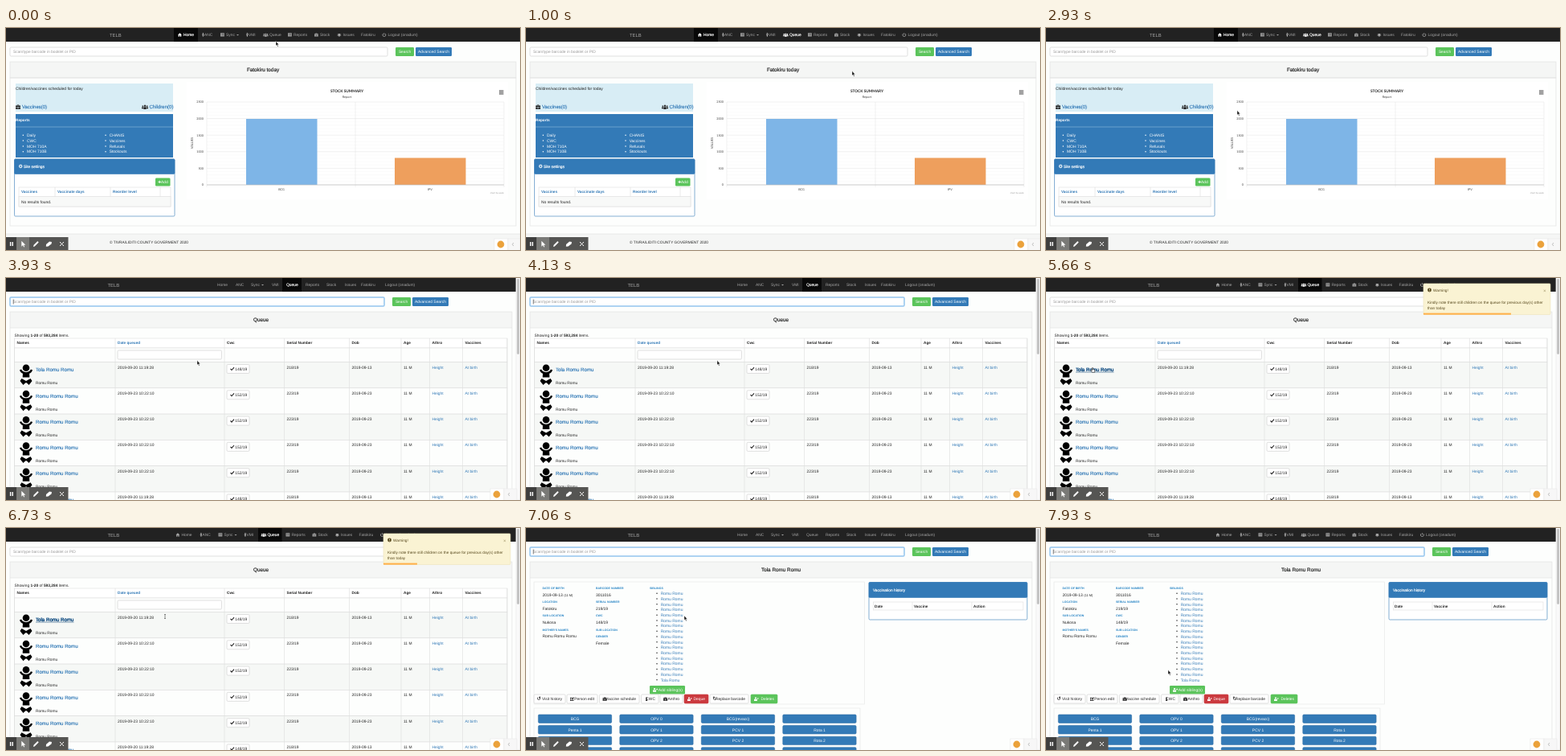
These frames come from a looping animation (640 px wide and 276 px high, 8000 ms). An HTML page:

```html
<!DOCTYPE html>
<html lang="en">
<head>
<meta charset="utf-8">
<title>Clinic queue</title>
<style>
  html, body { margin: 0; height: 100%; overflow: hidden; background: #fdfefd; }
  svg { display: block; width: 100vw; height: 100vh; }
  text { font-family: "Liberation Sans", Arial, sans-serif; text-rendering: geometricPrecision; white-space: pre; }
  .chart text { font-family: Lato, sans-serif; }
  .glyph { font-family: "DejaVu Sans", sans-serif; }
</style>
</head>
<body>
<svg id="stage" viewBox="0 0 640 276" preserveAspectRatio="none"></svg>
<script>
const BLUE = '#337ab7', GREEN = '#5bc45b', RED = '#cb3a3f', INK = '#222', LINE = '#ddd', PALE = '#f5f6f5';
const LOOP = 8000, QUEUE_AT = 3800, QUEUE_ICONS_AT = 4400, CHILD_AT = 7000, CHILD_ICONS_AT = 7400;
const TOAST_AT = 4720, BAR_AT = 4880, BAR_TIME = 2520;

const place = 'Fatokiru', user = 'onadum', surname = 'Romu Romu';
const child = 'Tola ' + surname, otherChild = 'Romu ' + surname;

const times = (n, draw) => Array.from({ length: n }, (_, i) => draw(i)).join('');
const rect = (x, y, w, h, fill, stroke = 'none', r = 0) =>
  `<rect x="${x}" y="${y}" width="${w}" height="${h}" fill="${fill}" stroke="${stroke}" stroke-width=".6" rx="${r}"/>`;
const path = (d, stroke, width = .6, fill = 'none') =>
  `<path d="${d}" stroke="${stroke}" stroke-width="${width}" fill="${fill}"/>`;
const dot = (x, y, r, fill) => `<circle cx="${x}" cy="${y}" r="${r}" fill="${fill}"/>`;
const group = (id, body, attrs = '') => `<g id="${id}" ${attrs}>${body}</g>`;

// y is the middle of the line; flags: b bold, m medium, c centred, e end-aligned, g glyph
function text(x, y, s, size = 4.95, fill = INK, flags = '') {
  const has = f => flags.includes(f);
  return `<text x="${x}" y="${y + size * .36}" font-size="${size}" fill="${fill}"` +
    (has('b') ? ' font-weight="700"' : '') +
    (has('m') ? ` stroke="${fill}" stroke-width=".18"` : '') +
    (has('c') ? ' text-anchor="middle"' : has('e') ? ' text-anchor="end"' : '') +
    (has('g') ? ' class="glyph"' : '') + `>${s}</text>`;
}

// Icons on a 6 x 6 grid
const icons = {
  home: 'M0 3.2L3 .2 6 3.2H5.2V6H3.6V4H2.4V6H.8V3.2Z',
  person: 'M2.2 0h1.6v1.5H2.2zM1.6 1.9h2.8v2.2h-.7V6H2.3V4.1h-.7z',
  list: 'M0 .4h6v5.2H0zM.8 1.6v.7h1v-.7zM2.3 1.6v.7h3v-.7zM.8 3.4v.7h1v-.7zM2.3 3.4v.7h3v-.7z',
  users: 'M2 .8h2v2H2zM1.3 3.2h3.4V6H1.3zM-.4 1.4h1.6V3H-.4zM-1 3.4h1.9v1.8H-1zM4.8 1.4h1.6V3H4.8zM5.1 3.4H7v1.8H5.1z',
  bag: 'M0 1.6h1.8V.5h2.4v1.1H6v1.7H0zM0 3.7h2.4v.7h1.2v-.7H6v2H0zM2.4 1.1v.5h1.2v-.5z',
  bug: 'M1.4 1.2h3.2v1H6v.7H4.9v.8H6v.7H4.8L3.9 5.7H2.1L1.2 4.4H0v-.7h1.1v-.8H0v-.7h1.4z',
  power: 'M2.6 0h.8v3h-.8zM1.6.8v.9A2 2 0 1 0 4.4 1.7V.8A2.8 2.8 0 1 1 1.6.8z',
  addUser: 'M1.2 .6h2.2v2.2H1.2zM0 3.3h4.5v2.5H0zM4.6 2h.7v-.8h.7V2h.8v.7H6v.8h-.7v-.8h-.7z',
  edit: 'M0 1h3.4v.8H.8v3.4h3.4V3.4H5V6H0zM2 3.4L4.9.4l.9.9L2.9 4.2 1.8 4.4z',
  info: 'M2.2.3h1.5v1.4H2.2zM1.8 2.2h1.9v2.9h.6V6H1.7v-.9h.6v-2h-.5z'
};
const icon = (name, x, y, fill, scale = .9) =>
  `<path transform="translate(${x} ${y - 3 * scale}) scale(${scale})" d="${icons[name]}" fill="${fill}" fill-rule="evenodd"/>`;

// label, icon, x with icon, x without icon
const navItems = [
  ['Home', 'home', 214, 263], ['ANC', 'person', 243, 286], ['Sync', 'list', 267, 305],
  ['VMI', 'person', 298, 331], ['Queue', 'users', 321, 349], ['Reports', 'list', 351, 373],
  ['Stock', 'bag', 384, 399], ['Issues', 'bug', 412.5, 422], [place, '', 442, 442],
  [`Logout (${user})`, 'power', 468.5, 472]
];
function navBar(active, withIcons, highlight) {
  const box = { Home: [209, 30], Queue: withIcons ? [316.5, 29.5] : [344, 24] }[active];
  return (box ? rect(box[0], 0, box[1], 17, '#080808') : '') + navItems.map(([label, name, iconX, bareX]) => {
    const on = label === active || label === highlight, color = on ? '#fff' : '#a5a5a5';
    const gap = !name ? 0 : name === 'person' ? 4 : 7;
    const x = withIcons ? iconX + gap : bareX;
    return (withIcons && name ? icon(name, iconX, 8.4, color, .8) : '') +
      text(x, 8.4, label, 4.9, color, on ? 'm' : '') +
      (label === 'Sync' ? path(`M${x + 13} 7.9h3l-1.5 1.6z`, 'none', 0, color) : '');
  }).join('');
}

function shell(width, title) {
  const shift = 640 - width, right = width - 5;
  return rect(0, 0, 640, 276, '#fdfefd') + rect(0, 0, width, 17, '#222') +
    text(129 - shift / 2, 8.4, 'TELB', 5.9, '#a5a5a5') +
    rect(5, 24, 470 - shift * .8, 11, '#fff', '#ccc', 1.3) +
    text(9, 29.5, 'Scan/type barcode in booklet or PID', 4.87, '#999') +
    rect(485 - shift * .8, 24, 23, 11, GREEN, 'none', 1.3) + text(496.5 - shift * .8, 29.5, 'Search', 4.8, '#fff', 'c') +
    rect(510 - shift * .8, 24, 45, 11, BLUE, 'none', 1.3) + text(532.5 - shift * .8, 29.5, 'Advanced Search', 4.95, '#fff', 'c') +
    rect(5, 42, right - 5, 20, PALE, LINE) + text(width / 2, 52, title, 6.35, INK, 'mc');
}
const scrollBar = rect(635, 0, 5, 276, '#fafafa', '#e8e8e8') + rect(636.2, 1, 2.8, 94, '#c1c1c1', 'none', 1.4);

function bulletList(x, y, step, items, fill) {
  return items.map((s, i) => dot(x, y + i * step, .75, fill === BLUE ? INK : fill) + text(x + 4.7, y + i * step, s, 4.95, fill)).join('');
}

function stockChart() {
  const top = 92, bottom = 195, left = 250, right = 620;
  return '<g class="chart">' + rect(225, 67, 400, 146, '#fff') +
    times(26, i => path(`M${left} ${top + i * 4.12}H${right}`, i % 5 ? '#f7f7f7' : '#e0e0e0', .5)) +
    times(6, i => text(246, bottom - i * 20.6, i * 500, 3.8, '#444', 'e')) +
    [left, 435, right].map(x => path(`M${x} ${top}V${bottom + 3}`, '#e0e0e0', .5)).join('') +
    rect(299, 113, 88.5, 82, '#7eb5e7') + rect(484, 161.5, 88.5, 33.5, '#ee9f5d') +
    path(`M${left} ${bottom}H${right}`, '#bbb') +
    text(424.5, 78, 'STOCK SUMMARY', 4.75, INK, 'bc') + text(424.5, 85.3, 'Report', 3.9, '#444', 'c') +
    text(343, 200.5, 'BCG', 3.8, '#444', 'c') + text(528, 200.5, 'IPV', 3.8, '#444', 'c') +
    `<g transform="rotate(-90 232 143)">${text(232, 143, 'VALUES', 4, '#444', 'c')}</g>` +
    path('M614 78h5.5m-5.5 2h5.5m-5.5 2h5.5', '#444', 1) +
    text(620, 205, 'chart by week', 2.8, '#999', 'e') + '</g>';
}

function homePage() {
  return shell(640, place + ' today') + rect(5, 62, 630, 184, 'none', LINE) +
    rect(12, 69, 196, 35, '#d8edf5') + text(12, 75, 'Children/vaccines scheduled for today', 4.97) +
    icon('bag', 12, 98, INK, 1) + text(20, 98, 'Vaccines(0)', 5.95, BLUE, 'm') +
    icon('users', 170, 98, INK, 1) + text(178.5, 98, 'Children(0)', 6.05, BLUE, 'm') +
    rect(12, 107, 196, 54, BLUE) + text(12, 114, 'Reports', 4.7, '#fff', 'b') + path('M12 123H208', '#8fb9db') +
    bulletList(21.3, 133.3, 6.8, ['Daily', 'CWC', 'MOH 710A', 'MOH 710B'], '#fff') +
    bulletList(124, 133.3, 6.8, ['CHANIS', 'Vaccines', 'Refusals', 'Stockouts'], '#fff') +
    rect(10.5, 163, 199.5, 71, '#fff', BLUE, 1.3) + rect(10.5, 163, 199.5, 18.5, BLUE, BLUE, 1.3) +
    text(15.5, 172, '⚙', 6, '#fff', 'gm') + text(22, 172, 'Site settings', 4.75, '#fff', 'm') +
    rect(186, 186.5, 18.5, 10, GREEN, 'none', 1.3) + text(195.5, 191.5, '✚Add', 4.6, '#fff', 'cg') +
    rect(16, 198, 189, 24, '#fff', LINE) + rect(16, 209.5, 189, 12.5, '#f8f9f8', LINE) +
    path('M61 198v11.5M130 198v11.5M192 198v11.5', LINE) +
    text(19, 203.2, 'Vaccines', 4.7, BLUE, 'b') + text(64, 203.2, 'Vaccinate days', 4.7, BLUE, 'b') +
    text(133, 203.2, 'Reorder level', 4.7, BLUE, 'b') + text(19, 215.8, 'No results found.') +
    stockChart() + rect(-1, 256, 642, 21, PALE, LINE) +
    text(129, 266.3, '© TIVRA/LIDITI COUNTY GOVERMENT 2020', 4.75) +
    group('homeNav', navBar('Home', true)) + group('homeNavClicked', navBar('Home', true, 'Queue'));
}

const baby = y => `<g transform="translate(25 ${y})">` + dot(0, 4.2, 4.3, '#000') +
  path('M-7 6.5Q-5.5 10.5 0 11Q5.5 10.5 7 6.5M-4 22.5L-6.2 19.5M4 22.5L6.2 19.5', '#000', 2.4) +
  path('M-4 10H4L4.3 16H-4.3Z', 'none', 0, '#000') +
  path('M-5.5 17.5L0 20.5 5.5 17.5 7.5 20.5 3.5 25.5 1.5 23.5 0 22.5-1.5 23.5-3.5 25.5-7.5 20.5Z', 'none', 0, '#000') + '</g>';

const columns = [10.5, 136, 272, 346.5, 427.5, 492, 527.5, 568.5, 624];
const headings = ['Names', 'Date queued', 'Cwc', 'Serial Number', 'Dob', 'Age', 'Athro', 'Vaccines'];

function queueRow(i) {
  const y = 104.5 + i * 32.3, first = i % 5 === 0;
  const [date, cwc, serial, dob] = first
    ? ['2019-09-20 11:19:28', '148/19', '218/19', '2019-09-13']
    : ['2019-09-23 10:22:10', '152/19', '223/19', '2019-09-23'];
  const cells = [date, '', serial, dob, '11 M', 'Height', 'At birth'];
  return rect(10.5, y, 613.5, 32.3, i % 2 ? '#fdfefd' : '#f6f8f6', LINE) + baby(y + 3) +
    text(37, y + 9.5, first ? child : otherChild, 6.15, BLUE, 'm') + text(37, y + 26, surname, 4.85) +
    cells.map((s, k) => text(columns[k + 1] + 3, y + 6.3, s, 4.9, k > 4 ? BLUE : INK)).join('') +
    rect(275, y + 3, 28, 11, '#fff', '#ccc', 1.3) +
    path(`M279.5 ${y + 8.4}l1.5 1.6 3-3.4`, INK, 1.1) + text(285.3, y + 8.5, cwc, 4.9);
}

function queuePage() {
  return shell(635, 'Queue') + path('M5 62V276M630 62V276', LINE) +
    text(10.5, 71, 'Showing <tspan font-weight="700">1-20</tspan> of <tspan font-weight="700">593,284</tspan> items.', 4.85) +
    rect(10.5, 75, 613.5, 12, '#fff', LINE) + rect(10.5, 87, 613.5, 17.5, '#fdfefd', LINE) +
    headings.map((s, k) => text(columns[k] + 3, 80.7, s, 4.7, k === 1 ? BLUE : INK, 'b')).join('') +
    times(6, queueRow) + columns.map(x => path(`M${x} 75V276`, LINE)).join('') +
    rect(139, 90, 129.5, 11, '#fff', '#ccc', 1.3) +
    group('hoverSecond', text(37, 146.3, otherChild, 6.15, '#23527c', 'm') + path('M37 149.4H90', '#23527c')) +
    group('hoverFirst', text(37, 114, child, 6.15, '#23527c', 'm') + path('M37 117.1H84.5', '#23527c')) +
    group('queueNavBare', navBar('Queue', false)) +
    group('queueNav', navBar('Queue', true), 'transform="translate(-2.5 0)"') + scrollBar;
}

const actions = [
  ['Visit history', '↺', 10, 39], ['Person edit', 'edit', 51, 38], ['Vaccine schedule', 'bag', 91.5, 49.5],
  ['CWC', 'info', 143.5, 21.5], ['Anthro', 'bag', 167, 28], ['Deque', 'addUser', 197, 30, RED],
  ['Replace barcode', '↻', 229, 48], ['Deletes', 'addUser', 280, 33, GREEN]
];
function actionButton([label, mark, x, w, fill]) {
  const color = fill ? '#fff' : INK, textX = x + w - 4;
  return rect(x, 207, w, 11, fill || '#fff', fill || '#ccc', 1.3) + text(textX, 212.5, label, 4.9, color, 'e') +
    (icons[mark] ? icon(mark, x + 4, 212.5, color, .85) : text(x + 3.6, 212.3, mark, 6, color, 'gm'));
}

function childPage() {
  const label = (x, y, s) => text(x, y, s, 3.55, '#2482c4', 'b');
  const field = (x, y, name, value) => label(x, y, name) + text(x, y + 8, value);
  const doses = [['BCG', 'OPV 0', 'BCG(revacc)', ''],
    ...[1, 2, 3].map(n => ['Penta', 'OPV', 'PCV', 'Rota'].map(s => s + ' ' + n))];
  return shell(635, child) + path('M5 62V276M630 62V276', LINE) + rect(10, 67, 411.5, 152, '#fdfefd', '#e4e4e4') +
    field(20.5, 75, 'DATE OF BIRTH', '2019-09-13 <tspan font-size="4">(11 M)</tspan>') +
    field(20.5, 92, 'LOCATION', place) + field(20.5, 109, 'SUB LOCATION', 'Nukosa') +
    field(20.5, 126.5, "MOTHER'S NAMES", otherChild) +
    field(87, 75, 'BARCODE NUMBER', '3011016') + field(87, 92, 'SERIAL NUMBER', '219/19') +
    field(87, 109, 'CWC', '148/19') + label(87, 126.5, 'SUB LOCATION') + field(87, 135, 'GENDER', 'Female') +
    label(154, 75, 'SIBLINGS') + bulletList(163, 81.3, 6.72, [...Array(16).fill(surname), 'Tola Romu'], BLUE) +
    rect(154, 196, 44, 10.5, GREEN, 'none', 1.3) + icon('addUser', 158, 201.2, '#fff') + text(195, 201.2, 'Add sibling(s)', 5, '#fff', 'e') +
    actions.map(actionButton).join('') + rect(10, 224, 406, 60, '#fdfefd', '#e4e4e4') +
    doses.map((row, r) => row.map((s, c) => rect(15.3 + c * 101.5, 232 + r * 13.6, 91.3, 10.4, BLUE, '#2e6da4', 1.3) +
      text(61 + c * 101.5, 237.3 + r * 13.6, s, 4.95, '#fff', 'c')).join('')).join('') +
    rect(427, 67.5, 197, 46.5, '#fff', BLUE, 1.3) + rect(427, 67.5, 197, 19, BLUE, BLUE, 1.3) +
    text(432, 77, 'Vaccination history', 4.85, '#fff', 'm') + rect(432.5, 92, 186.5, 10, '#fff', LINE) +
    path('M481 92v10M555 92v10', LINE) + text(434, 97, 'Date', 4.7, INK, 'b') +
    text(483, 97, 'Vaccine', 4.7, INK, 'b') + text(557, 97, 'Action', 4.7, INK, 'b') +
    group('childNavBare', navBar('', false)) +
    group('childNav', navBar('', true), 'transform="translate(-2.5 0)"') + scrollBar;
}

const toast = rect(470, 7, 158, 38.5, '#faf3d3', '#eee5bd', 1) + dot(477.5, 15, 2.4, '#594a1e') +
  path('M477.5 13.5v1.7m0 .6v.8', '#faf3d3', .8) + text(482, 15, 'Warning!', 4.75, '#594a1e') +
  text(621, 16, '×', 6.5, '#a89d72', 'c') +
  text(475, 30, 'Kindly note there still children on the queue for previous day(s) other', 4.75, '#594a1e') +
  text(475, 37, 'than today', 4.75, '#594a1e') +
  '<rect id="toastBar" x="470" y="43.6" height="2" fill="#ffb04a"/>';

const recorder = rect(0, 260, 77.5, 16, '#555553') + rect(0, 260, 13, 16, '#3f3f3e') + rect(13, 260, 16, 16, '#7a7a77') +
  path('M5.6 266v5M8.2 266v5', '#fff', 1.4) + path('M19.3 264.7v7l1.7-1.6 1.2 2.5 1-.5-1.2-2.3h2.3z', 'none', 0, '#fff') +
  path('M35 270.7l5-5', '#fff', 2) + path('M34 272l.4-1.9 1.4 1.4z', 'none', 0, '#fff') +
  path('M50 269l4-3.5 3 .5-.5 2.5-4 3-2.7.2z', 'none', 0, '#fff') + path('M67 266l5 5m0-5l-5 5', '#fff', 1);
const widget = rect(608, 262, 17, 15, '#fff', '#e6e6e6') + rect(625, 262, 16, 15, '#f7f7f7', '#e6e6e6') +
  dot(616, 269, 4.4, '#eba23c') + path('M632 267l-1.6 2 1.6 2', '#999');

document.getElementById('stage').innerHTML =
  group('home', homePage()) + group('queue', queuePage()) + group('child', childPage()) +
  group('focus', rect(5, 24, 466, 11, 'none', '#cfe5f7', 1.3).replace('".6"', '"2"') + rect(5, 24, 466, 11, 'none', '#5fa9e6', 1.3)) +
  group('caret', path('M9.2 26.5v6', INK, .6)) + group('toast', toast) + recorder + group('widget', widget) +
  group('pointer', group('arrow', path('M0-2.5V3L1.2 2 2.2 4.2 3.1 3.8 2.1 1.7H3.8Z', '#fff', .4, '#111')) +
    group('hand', path('M-.6-2.3h1.2v2l2.3.6-.4 3h-3L-2.2.9-1.7.4-.6 1Z', '#222', .6, '#fff')) +
    group('beam', path('M-1-2.5h2M0-2.5v5M-1 2.5h2', '#444', .6)));

const $ = id => document.getElementById(id);
const show = (id, on) => $(id).setAttribute('visibility', on ? 'inherit' : 'hidden');
const clamp = v => Math.max(0, Math.min(1, v));
const smooth = v => v * v * (3 - 2 * v);

// time, x, y
const route = [[0, 336, 19], [200, 335, 10], [400, 335, 10], [860, 406, 56], [1460, 406, 56], [1860, 300, 82],
  [2000, 300, 82], [2730, 238, 105], [4400, 238, 105], [4800, 38, 146.5], [4950, 38, 146.5], [5260, 58, 114],
  [6130, 58, 114], [6500, 198, 110], [7000, 198, 110], [7700, 152, 179], [LOOP, 152, 179]];
function pointerAt(t) {
  const i = route.findIndex(p => p[0] > t), a = route[i - 1], b = route[i];
  const k = smooth((t - a[0]) / (b[0] - a[0]));
  return [a[1] + (b[1] - a[1]) * k, a[2] + (b[2] - a[2]) * k];
}

function render(t) {
  const page = t < QUEUE_AT ? 'home' : t < CHILD_AT ? 'queue' : 'child';
  for (const id of ['home', 'queue', 'child']) $(id).style.display = id === page ? '' : 'none';
  show('homeNav', t < 300);
  show('homeNavClicked', t >= 300);
  show('queueNavBare', t < QUEUE_ICONS_AT);
  show('queueNav', t >= QUEUE_ICONS_AT);
  show('childNavBare', t < CHILD_ICONS_AT);
  show('childNav', t >= CHILD_ICONS_AT);

  const focused = page === 'child' || page === 'queue' && t < 5500;
  const sinceLoad = t - (page === 'child' ? CHILD_AT : QUEUE_AT);
  show('focus', focused);
  show('caret', focused && Math.floor(sinceLoad / 350) % 2 === 0);

  const [x, y] = pointerAt(t);
  const overNames = page === 'queue' && x > 35 && x < 91;
  const overSecond = overNames && Math.abs(y - 146.3) < 4;
  const overFirst = overNames && Math.abs(y - 114) < 4;
  const overText = page === 'queue' && t > 6400;
  show('hoverSecond', overSecond);
  show('hoverFirst', overFirst || t >= 5500);
  show('hand', overSecond || overFirst);
  show('beam', overText);
  show('arrow', !overSecond && !overFirst && !overText);
  $('pointer').setAttribute('transform', `translate(${x} ${y})`);

  const entry = clamp((t - TOAST_AT) / 220);
  show('toast', page === 'queue' && t >= TOAST_AT);
  $('toast').setAttribute('transform', `translate(0 ${-16 * (1 - entry) ** 2})`);
  $('toast').setAttribute('opacity', clamp(entry * 1.45));
  $('toastBar').setAttribute('width', 158 * (1 - clamp((t - BAR_AT) / BAR_TIME)));
  $('widget').setAttribute('transform', `translate(${page === 'home' ? 0 : -5} 0)`);
}

const start = performance.now();
(function tick() {
  render((performance.now() - start) % LOOP);
  requestAnimationFrame(tick);
})();
</script>
</body>
</html>
```
